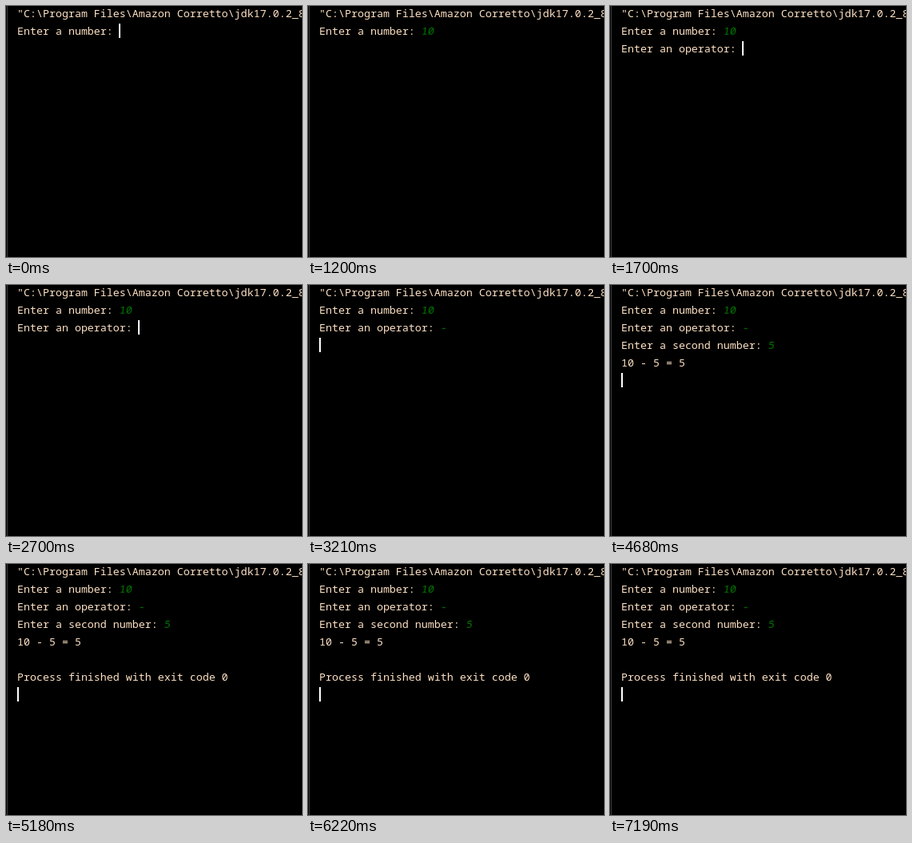
These frames come from a looping animation (370 px wide and 314 px high, 7460 ms). An HTML page:

```html
<!DOCTYPE html>
<html lang="en">
<head>
<meta charset="utf-8">
<title>Console calculator</title>
<style>
html, body {
  margin: 0;
  width: 100%;
  height: 100%;
  overflow: hidden;
  background: #000;
}
.console {
  position: relative;
  width: 370px;
  height: 314px;
  overflow: hidden;
  color: #ffe2c4;
  font: 500 13.32px/22px "Noto Sans Mono", "DejaVu Sans Mono", monospace;
  font-variant-ligatures: none;
}
.edge {
  position: absolute;
  left: 1px;
  top: 0;
  width: 1px;
  height: 100%;
  background: #3c3f41;
}
.text {
  position: absolute;
  left: 14px;
  top: -2px;
}
.text div {
  height: 22px;
  white-space: pre;
}
.text b {
  display: inline-block;
  font-weight: 400;
  color: #007f00;
  transform: skewX(-9deg);
}
.step { animation: 7460ms step-end infinite; }
.one { animation-name: one; }
.zero { animation-name: zero; }
.ask-op { animation-name: ask-op; }
.minus { animation-name: minus; }
.ask-second { animation-name: ask-second; }
.five { animation-name: five; }
.result { animation-name: result; }
.exit { animation-name: exit; }

@keyframes one { 0% { opacity: 0 } 8.042%, 100% { opacity: 1 } }
@keyframes zero { 0% { opacity: 0 } 9.383%, 100% { opacity: 1 } }
@keyframes ask-op { 0% { opacity: 0 } 22.787%, 100% { opacity: 1 } }
@keyframes minus { 0% { opacity: 0 } 37.533%, 100% { opacity: 1 } }
@keyframes ask-second { 0% { opacity: 0 } 45.71%, 100% { opacity: 1 } }
@keyframes five { 0% { opacity: 0 } 53.351%, 100% { opacity: 1 } }
@keyframes result { 0% { opacity: 0 } 62.734%, 100% { opacity: 1 } }
@keyframes exit { 0% { opacity: 0 } 69.436%, 100% { opacity: 1 } }

.caret {
  position: absolute;
  left: 0;
  top: 0;
  width: 2px;
  height: 18px;
  background: #fff;
  animation-name: move, blink;
}
@keyframes move {
  0% { transform: translate(141px, 22px) }
  8.042% { transform: translate(149px, 22px) }
  9.383% { transform: translate(157px, 22px) }
  20.107% { transform: translate(14px, 44px) }
  22.787% { transform: translate(165px, 44px) }
  37.533% { transform: translate(173px, 44px) }
  43.029% { transform: translate(14px, 66px) }
  45.71% { transform: translate(197px, 66px) }
  53.351% { transform: translate(205px, 66px) }
  59.651% { transform: translate(14px, 88px) }
  62.734% { transform: translate(14px, 110px) }
  69.436%, 100% { transform: translate(14px, 154px) }
}
@keyframes blink {
  0%, 20.107%, 36.193%, 83.378%, 96.38%, 100% { opacity: 1 }
  16.085%, 29.49%, 76.273%, 89.678% { opacity: 0 }
}
</style>
</head>
<body>
<div class="console">
  <div class="edge"></div>
  <div class="text">
    <div>"C:\Program Files\Amazon Corretto\jdk17.0.2_8</div>
    <div>Enter a number: <b class="step one">1</b><b class="step zero">0</b></div>
    <div><span class="step ask-op">Enter an operator: </span><b class="step minus">-</b></div>
    <div><span class="step ask-second">Enter a second number: </span><b class="step five">5</b></div>
    <div class="step result">10 - 5 = 5</div>
    <div></div>
    <div class="step exit">Process finished with exit code 0</div>
  </div>
  <div class="step caret"></div>
</div>
</body>
</html>
```
